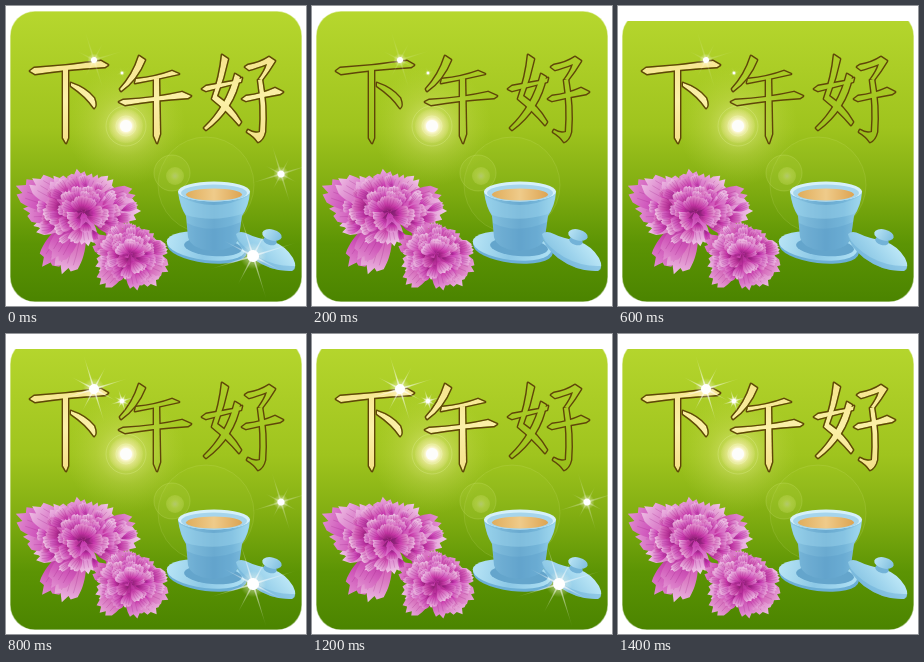
Write an HTML page with a canvas that moves like this. It is 300 px wide and 300 px high and loops after 1.6 s.

```html
<!DOCTYPE html>
<html lang="zh">
<head>
<meta charset="utf-8">
<title>下午好</title>
<style>
html, body { margin: 0; width: 100%; height: 100%; overflow: hidden; background: #fff; }
canvas { display: block; width: 300px; height: 300px; }
</style>
</head>
<body>
<canvas id="stage" role="img" aria-label="下午好"></canvas>
<script>
const SIZE = 300, STEP = 200;
const scale = Math.max(1, window.devicePixelRatio || 1);

// Each step: filled characters, upper stars, lower stars, cropped card top
const steps = [
  [3, 0, 1, 0], [0, 0, 0, 0], [0, 1, 1, 0], [1, 0, 0, 1],
  [1, 1, 1, 1], [2, 0, 0, 1], [2, 1, 1, 1], [3, 1, 0, 1]
];

// Brush strokes of 下, 午 and 好
const glyphs = [
  ['M24 65L28 62Q62 60 95 55L102 59L99 61Q62 63 29 68Z',
   'M57 64L62 63L62 132L60 137L57 132Z',
   'M65 77Q80 82 88 92Q91 100 88 102Q80 90 65 80Z'],
  ['M133 50L139 54Q131 74 115 85L114 83Q127 69 133 50Z',
   'M130 73Q150 71 166 65L173 68Q152 73 129 77Z',
   'M113 96L117 94Q150 92 176 86L185 90L182 92Q148 94 119 99Z',
   'M148 73L153 72L154 128L151 137L148 130Z'],
  ['M216 49L222 53Q218 72 211 90Q226 100 235 116L233 119Q221 105 206 93Q214 70 216 49Z',
   'M229 68L234 71Q228 103 200 124L198 122Q221 100 229 68Z',
   'M196 83L200 80L228 75L236 72L235 76L200 85Z',
   'M239 61L242 59Q254 57 263 51L269 55Q263 65 256 74L253 73Q259 65 261 58Q250 62 243 64Z',
   'M252 74L256 73Q261 100 259 126Q257 134 252 136Q248 130 241 126L242 124Q248 128 254 126Q256 100 252 74Z',
   'M236 93L240 90Q256 88 269 82L277 86L274 88Q256 91 240 95Z']
].map(list => list.map(d => new Path2D(d)));

function layer(paint, canvas = document.createElement('canvas')) {
  canvas.width = canvas.height = Math.round(SIZE * scale);
  const g = canvas.getContext('2d');
  g.scale(scale, scale);
  if (paint) paint(g);
  return canvas;
}

function stops(grad, colors) {
  colors.forEach((c, i) => grad.addColorStop(i / (colors.length - 1), c));
  return grad;
}
const linear = (g, x1, y1, x2, y2, ...c) => stops(g.createLinearGradient(x1, y1, x2, y2), c);
const radial = (g, x, y, r, ...c) => stops(g.createRadialGradient(x, y, 0, x, y, r), c);

function oval(g, x, y, rx, ry, fill, turn = 0) {
  g.beginPath();
  g.ellipse(x, y, rx, ry, turn, 0, Math.PI * 2);
  g.fillStyle = fill;
  g.fill();
}

function shape(g, d, fill) {
  g.fillStyle = fill;
  g.fill(new Path2D(d));
}

function glow(g, x, y, r, ...colors) {
  oval(g, x, y, r, r, radial(g, x, y, r, ...colors));
}

function ring(g, x, y, r, alpha) {
  g.beginPath();
  g.arc(x, y, r, 0, Math.PI * 2);
  g.strokeStyle = `rgba(235,245,170,${alpha})`;
  g.lineWidth = 1;
  g.stroke();
}

function seeded(seed) {
  return () => (seed = (seed * 16807) % 2147483647) / 2147483647;
}

function drawCard(g) {
  g.beginPath();
  g.roundRect(4, 5, 292, 291, 25);
  g.fillStyle = linear(g, 0, 5, 0, 296, '#b6d72e', '#abcd26', '#9fc41e', '#82ae12', '#5c9404', '#4b8400');
  g.fill();
  g.strokeStyle = 'rgba(255,255,255,.5)';
  g.lineWidth = 1.5;
  g.stroke();
  glow(g, 120, 120, 60, 'rgba(245,245,170,.65)', 'rgba(225,232,120,.25)', 'rgba(200,225,80,0)');
  oval(g, 200, 179, 48, 48, 'rgba(200,225,90,.06)');
  ring(g, 200, 179, 48, .12);
  oval(g, 166, 167, 18, 18, 'rgba(205,225,100,.12)');
  ring(g, 166, 167, 18, .16);
  glow(g, 169, 170, 9, 'rgba(190,205,140,.7)', 'rgba(215,230,120,.35)', 'rgba(225,235,130,.2)');
  ring(g, 120, 120, 20, .25);
  glow(g, 120, 120, 17, '#fff', '#fffbe0', 'rgba(250,240,180,.45)', 'rgba(250,240,170,.1)');
  ring(g, 120, 120, 10, .6);
  oval(g, 120, 120, 6, 6, '#fdfdfb');
}

function petal(g, x, y, angle, len, width, rand) {
  const tone = rand() * 18 - 9;
  const pink = (s, l) => `hsl(${309 + rand() * 6},${s}%,${l + tone}%)`;
  g.save();
  g.translate(x, y);
  g.rotate(angle);
  g.fillStyle = linear(g, 0, 0, len, 0, pink(66, 36), pink(58, 52), pink(56, 65), pink(58, 80));
  g.beginPath();
  g.moveTo(0, 0);
  g.bezierCurveTo(len * .25, -width * .6, len * .55, -width * 1.1, len * .86, -width * .75);
  g.lineTo(len * (.9 + rand() * .1), -width * .35);
  g.lineTo(len * .88, -width * .15);
  g.lineTo(len, width * .15);
  g.lineTo(len * .87, width * .4);
  g.lineTo(len * (.85 + rand() * .1), width * .75);
  g.bezierCurveTo(len * .55, width * 1.1, len * .25, width * .6, 0, 0);
  g.fill();
  g.strokeStyle = 'rgba(150,30,130,.3)';
  g.lineWidth = .7;
  for (let i = -1; i <= 1; i++) {
    g.beginPath();
    g.moveTo(len * .2, i * width * .1);
    g.quadraticCurveTo(len * .5, i * width * .45, len * .82, i * width * .4);
    g.stroke();
  }
  g.restore();
}

// Long petals reach the given tips, ruffles crowd the heart
function bloom(g, x, y, tips, rx, ry, seed) {
  const rand = seeded(seed);
  for (const [tx, ty] of tips) {
    const len = Math.hypot(tx - x, ty - y);
    petal(g, x, y, Math.atan2(ty - y, tx - x), len, 6 + len * .14, rand);
  }
  const count = 60;
  for (let i = 0; i < count; i++) {
    const r = 1 - i / count, a = i * 2.4;
    const dx = Math.cos(a) * rx * r, dy = Math.sin(a) * ry * r;
    const lean = Math.atan2(dy - 5, dx) + rand() - .5;
    petal(g, x + dx, y + dy, lean, 10 + rand() * 9, 4 + rand() * 4, rand);
  }
}

function drawFlowers(g) {
  bloom(g, 77, 205, [
    [38, 262], [58, 269], [47, 255], [84, 240], [28, 222], [17, 205], [9, 182], [25, 174],
    [46, 171], [69, 163], [90, 168], [106, 172], [129, 187], [135, 203], [122, 220]
  ], 38, 24, 4211);
  bloom(g, 124, 247, [
    [86, 236], [90, 262], [95, 280], [115, 274], [133, 284], [152, 279], [163, 264],
    [161, 242], [147, 226], [126, 218], [104, 221]
  ], 22, 17, 907);
}

function drawCup(g) {
  // Saucer
  oval(g, 201, 243, 40, 14, '#6cafd5', .12);
  oval(g, 200, 240, 39.5, 14, linear(g, 160, 232, 238, 250, '#b9e5f6', '#8cc8e6', '#aee0f4'), .12);
  oval(g, 207, 241, 29, 9, '#64a5cc', .08);
  // Bowl
  shape(g, 'M172 186Q174 201 180 210L182 231Q185 243 207 245Q231 243 233 231L236 210Q243 200 244 186Z',
    linear(g, 172, 0, 244, 0, '#8ecae6', '#78b6d8', '#6aaad0', '#74b5d9', '#9bd4ec'));
  shape(g, 'M181 217Q205 229 235 216L233 231Q231 243 207 245Q185 243 182 231Z', 'rgba(75,145,190,.25)');
  shape(g, 'M173 190Q207 208 243 190Q241 202 236 208Q207 217 180 209Q175 202 173 190Z', 'rgba(170,222,242,.35)');
  oval(g, 208, 185.5, 36, 10, '#d5f0fa');
  oval(g, 208, 187, 33, 8.5, '#a6d5ec');
  oval(g, 208, 188.5, 28, 6, linear(g, 180, 0, 236, 0, '#e0ad5c', '#efcb8a', '#dda452'));
  // Lid
  shape(g, 'M230 228Q231 240 246 252Q265 266 286 265Q292 262 287 252Q280 240 266 235Q250 232 242 228Q234 224 230 228Z',
    linear(g, 242, 256, 270, 232, '#83c1e1', '#9dd3ec', '#bbe6f6'));
  shape(g, 'M230 229Q234 240 252 251Q270 261 289 260Q290 264 286 265Q265 266 246 252Q231 240 230 229Z', 'rgba(95,165,210,.4)');
  oval(g, 264, 235, 7, 4, '#73b3d8', .3);
  oval(g, 266, 229, 10, 5.5, linear(g, 257, 224, 274, 234, '#b9e4f5', '#82c0e0'), .25);
}

function trace(g, list, color, width) {
  g.strokeStyle = color;
  g.lineWidth = width;
  g.lineJoin = 'round';
  list.forEach(p => g.stroke(p));
}

const art = layer(g => {
  drawCard(g);
  drawFlowers(g);
  drawCup(g);
});

// Joined outline with the inside cut away
const outlines = glyphs.map(list => layer(g => {
  trace(g, list, '#5f4509', 2.8);
  g.globalCompositeOperation = 'destination-out';
  list.forEach(p => g.fill(p));
}));

const fills = glyphs.map(list => layer(g => {
  g.fillStyle = linear(g, 0, 50, 0, 138, '#f6e48c', '#fbf0a8', '#f4e087');
  list.forEach(p => g.fill(p));
}));

function star(g, x, y, core, long, short, alpha = .8) {
  g.save();
  g.translate(x, y);
  glow(g, 0, 0, core * 2.2, 'rgba(255,255,255,.9)', 'rgba(255,255,240,.35)', 'rgba(255,255,230,0)');
  g.rotate(-.3);
  for (let i = 0; i < 8; i++) {
    const len = i % 2 ? short : long;
    g.fillStyle = linear(g, 0, 0, len, 0, `rgba(255,255,255,${alpha})`, `rgba(255,255,255,${alpha * .5})`, 'rgba(255,255,255,0)');
    g.beginPath();
    g.moveTo(0, -1);
    g.lineTo(len, 0);
    g.lineTo(0, 1);
    g.fill();
    g.rotate(Math.PI / 4);
  }
  oval(g, 0, 0, core, core, '#fff');
  g.restore();
}

const stage = layer(null, document.getElementById('stage'));
const ctx = stage.getContext('2d');
const put = image => ctx.drawImage(image, 0, 0, SIZE, SIZE);
let shown = -1;

function draw([filled, upper, lower, crop]) {
  ctx.fillStyle = '#fff';
  ctx.fillRect(0, 0, SIZE, SIZE);
  put(art);
  if (crop) ctx.fillRect(0, 0, SIZE, 15);
  fills.slice(0, filled).forEach(put);
  outlines.forEach(put);
  if (upper) {
    star(ctx, 88, 55, 5, 36, 26);
    star(ctx, 116, 67, 2.2, 13, 9);
  } else {
    star(ctx, 88, 54, 3, 32, 20, .2);
    star(ctx, 116, 67, 1.2, 6, 4, .2);
  }
  if (lower) {
    star(ctx, 275, 168, 3.5, 32, 18, .4);
    star(ctx, 247, 250, 6, 46, 34, .7);
  }
}

function tick() {
  const index = Math.floor(performance.now() / STEP) % steps.length;
  if (index !== shown) draw(steps[shown = index]);
  requestAnimationFrame(tick);
}
tick();
</script>
</body>
</html>
```
